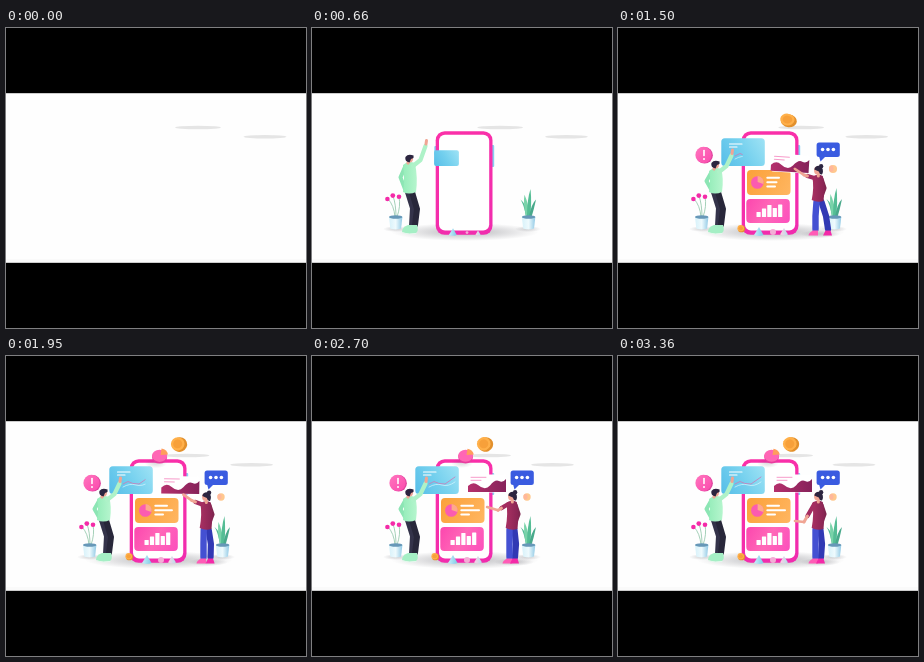
These frames come from a looping animation (300 px wide and 300 px high, 3390 ms). An HTML page with a canvas:

```html
<!DOCTYPE html>
<html lang="en">
<head>
<meta charset="utf-8">
<title>Phone dashboard</title>
<style>
html, body { margin: 0; width: 100%; height: 100%; overflow: hidden; background: #000; }
canvas { display: block; width: 300px; height: 300px; }
</style>
</head>
<body>
<canvas width="300" height="300"></canvas>
<script>
const c = document.querySelector('canvas').getContext('2d');
const LOOP = 3390, PINK = '#f42aa8', SKIN = '#f0a594', HAIR = '#2c2540';
let t = 0;

const progress = (start, dur) => Math.min(1, Math.max(0, (t - start) / dur));
const smooth = p => p * p * (3 - 2 * p);
const back = p => p <= 0 ? 0 : 1 + 2.7 * (p - 1) ** 3 + 1.7 * (p - 1) ** 2;

// Returns a function that eases through one value per time.
const track = (...times) => (...values) => {
  const i = times.findIndex(time => time > t);
  if (i === 0) return values[0];
  if (i < 0) return values.at(-1);
  const p = smooth((t - times[i - 1]) / (times[i] - times[i - 1]));
  return values[i - 1] + (values[i] - values[i - 1]) * p;
};

function group(x, y, sx, sy, angle, draw) {
  c.save();
  c.translate(x, y);
  c.rotate(angle);
  c.scale(sx, sy);
  c.translate(-x, -y);
  draw();
  c.restore();
}
function pop(start, dur, x, y, draw) {
  const s = back(progress(start, dur));
  if (s > 0) group(x, y, s, s, 0, draw);
}
function fade(start, dur, draw) {
  c.save();
  c.globalAlpha = smooth(progress(start, dur));
  if (c.globalAlpha > 0) draw();
  c.restore();
}
function oval(x, y, rx, ry, fill) {
  c.beginPath();
  c.ellipse(x, y, rx, ry, 0, 0, 7);
  c.fillStyle = fill;
  c.fill();
}
const dot = (x, y, r, fill) => oval(x, y, r, r, fill);
function box(x, y, w, h, r, fill) {
  c.beginPath();
  c.roundRect(x, y, w, h, r);
  c.fillStyle = fill;
  c.fill();
}
function shape(d, fill) {
  c.fillStyle = fill;
  c.fill(new Path2D(d));
}
function stroke(d, color, width) {
  c.strokeStyle = color;
  c.lineWidth = width;
  c.lineCap = c.lineJoin = 'round';
  c.stroke(new Path2D(d));
}
function blend(x1, y1, x2, y2, ...colors) {
  const g = c.createLinearGradient(x1, y1, x2, y2);
  colors.forEach((color, i) => g.addColorStop(i / (colors.length - 1), color));
  return g;
}
function shadow(x, y, rx, ry, alpha) {
  group(x, y, 1, ry / rx, 0, () => {
    const g = c.createRadialGradient(x, y, 0, x, y, rx);
    g.addColorStop(0, `rgba(70,70,80,${alpha})`);
    g.addColorStop(1, 'rgba(70,70,80,0)');
    dot(x, y, rx, g);
  });
}

function clouds() {
  const s = t / 1000;
  oval(192 - 5.9 * s, 99.5, 23, 1.8, '#e5e5e5');
  oval(259 - 6.85 * s, 108.8, 21.5, 1.8, '#e5e5e5');
}

function phone() {
  fade(150, 400, () => shadow(153, 204, 74, 9, .38));
  pop(60, 580, 152, 207, () => {
    box(122.3, 118, 3, 9, 1, '#86cff2');
    box(179, 117, 3.2, 22, 1, '#86cff2');
    box(123.7, 103.2, 56.8, 103.6, 9, blend(123, 103, 180, 207, '#fb30a8', '#f02cae'));
    box(127, 106.7, 50.2, 95.8, 6, '#fff');
  });
}

function pot(x) {
  shape(`M${x - 6.7} 189h13.4l-1.3 11.5q-5.4 2-10.8 0z`, blend(x - 6, 0, x + 6, 0, '#d9f2fa', '#eefafd', '#9ccfe8'));
  oval(x, 189, 6.7, 1.7, '#6798b8');
}

function plants() {
  pop(180, 420, 84, 201, () => {
    shadow(84, 201, 13, 3, .25);
    stroke('M83 189Q82 177 76 171M84 189Q84 176 81 168M85 189Q89 178 87 169', '#8fc5a8', .8);
    dot(75.4, 171, 2.3, PINK);
    dot(80.8, 167.6, 2.4, PINK);
    dot(87, 168.8, 2.3, PINK);
    pot(83.7);
  });
  pop(330, 350, 216, 201, () => {
    shadow(216, 201, 13, 3, .25);
    const grow = back(progress(510, 450));
    if (grow) group(216, 189, 1, grow, 0, () => {
      shape('M214 189Q212 176 208.5 171Q214 175 216.5 189Z', '#55bb97');
      shape('M214 189Q211 174 212.5 166Q217 176 217.5 189Z', '#79d3a9');
      shape('M215 189Q215 171 218.5 160Q220 175 218 189Z', '#55bd95');
      shape('M217 189Q219 176 224 171Q222 181 219.5 189Z', '#49a98b');
    });
    pot(216.6);
  });
}

function man() {
  const at = track(240, 660, 1000);
  const rise = at(0, -6, 0), handY = at(130, 114, 123.5);
  fade(220, 330, () => {
    stroke('M96 164L101 180L100 198', '#34334a', 6);
    stroke('M100 164L105 181L103 197', '#28273a', 6);
    shape('M90 204Q90 199 96 197L105 197Q107 203 104 205Q96 207 90 204Z', '#a5efc5');
    stroke('M91 205Q97 207 104 205.5', '#e6f8ee', 1);
    // Far arm on the hip
    stroke(`M93 ${145 + rise}L88.5 ${153 + rise * .6}L93 161`, '#8ce5b4', 4);
    shape(`M91 ${143 + rise}Q96 ${138 + rise} 103 ${141 + rise}Q106 150 104 164Q97 167 91 164Q93 152 91 ${143 + rise}Z`,
      blend(90, 0, 106, 0, '#94ecb9', '#b8f6cf'));
    stroke(`M101 ${144 + rise}L108.5 ${138 + rise}L113.5 ${handY + 4}`, '#aef2c8', 4.2);
    stroke(`M114 ${handY + 2}L114.5 ${handY - 1.5}`, SKIN, 3);
    stroke(`M96 ${141 + rise}L97 ${138 + rise}`, SKIN, 3.2);
    oval(97.8, 136.8 + rise, 3.2, 3.6, SKIN);
    shape(`M93.4 ${135 + rise}Q96 ${131.5 + rise} 101.6 ${133.6 + rise}L101.5 ${136 + rise}L99 ${137 + rise}L97.5 ${140.5 + rise}Q92.5 ${139.5 + rise} 93.4 ${135 + rise}Z`, HAIR);
  });
}

function blueCard() {
  pop(580, 540, 147, 138, () => {
    box(103.3, 110.2, 43.5, 27.8, 3.5, blend(103, 138, 147, 110, '#55bde8', '#74d0ee', '#a0e3f5'));
    fade(900, 200, () => stroke('M111.5 116H124M111.5 119H119', '#fff', 1.2));
    const reveal = smooth(progress(1050, 1250));
    if (!reveal) return;
    c.save();
    c.beginPath();
    c.rect(116, 110, 29 * reveal, 28);
    c.clip();
    stroke('M117 128L122 125.5L127 127.5L133 128L143 121', '#c583bd', .9);
    stroke('M117 131Q124 127 130 129T143 126', '#d9f6ff', .7);
    c.restore();
  });
}

function barCard() {
  pop(860, 500, 150, 183, () => {
    box(128.3, 171, 43.5, 24, 4, blend(128, 171, 172, 195, '#fc46ae', '#ff68b8', '#fc4fbd'));
    [5, 8.5, 12, 9, 12.5].forEach((height, i) => {
      const h = height * back(progress(740 + i * 25, 320));
      box(138.5 + i * 5.4, 189 - h, 4.2, h, .5, '#fff');
    });
  });
}

function pieCard() {
  pop(990, 430, 150.5, 154, () => {
    box(129, 142, 43.5, 25, 4, blend(129, 142, 172, 167, '#fba13a', '#fdab4c', '#ffb661'));
    dot(139.3, 154.5, 6.3, '#fb5cb0');
    shape('M139.6 154V148A6.3 6.3 0 0 1 145.4 156Z', '#ffa98a');
    const end = 158 + 9 * smooth(progress(1400, 700));
    stroke(`M149.3 149.8H161M149.3 154.2H${end}M149.3 158.6H157`, '#fff', 2);
  });
}

function chat() {
  pop(920, 500, 208, 126, () => {
    box(198.6, 114.6, 23.2, 14.4, 2.5, '#3a5be0');
    shape('M201 128H208L202.5 133.5Z', '#3a5be0');
    [204.6, 210, 215.4].forEach(x => dot(x, 121.5, 1.8, '#fff'));
  });
}

function coin(x, y, rx, ry, angle) {
  group(x, y, 1, 1, angle, () => {
    oval(x + rx * .12, y + ry * .12, rx, ry * .95, '#e2902c');
    oval(x - rx * .08, y - ry * .06, rx * .9, ry * .88, '#ffb04a');
    oval(x - rx * .08, y - ry * .06, rx * .6, ry * .58, '#f7a03a');
  });
}

function pieBadge() {
  pop(1560, 450, 154, 101, () => {
    shadow(150, 107, 11, 5, .2);
    oval(153.6, 101, 7.4, 6.4, '#e93d9f');
    oval(153.6, 99.8, 7.4, 6, '#ff66b5');
    shape('M154.5 99L155.5 92.8Q161 94 161.8 98.5Z', '#ff9d5c');
  });
}

function trinkets() {
  pop(1100, 400, 86, 127, () => {
    dot(86.6, 127.3, 8.3, '#e0459f');
    dot(85.5, 126.9, 8.1, blend(78, 120, 93, 135, '#ff73bd', '#fb4bae'));
    stroke('M86 122.5V127.5', '#fff', 1.6);
    dot(86, 131, 1, '#fff');
  });
  const at = track(1150, 1500, 2000);
  const x = at(169, 170, 172.5), y = at(98, 92, 88);
  pop(1150, 450, x, y, () => coin(x, y, 7.6, at(6, 6.4, 7.6), at(0, .1, -.4)));
  pop(1250, 400, 215, 141, () => {
    dot(215, 141, 3.7, '#ffc88e');
    oval(213.5, 140.7, 2, 2.8, '#ffb79b');
  });
  pieBadge();
  pop(570, 350, 141, 207, () => shape('M141 199L145.5 207Q141 209 136 207Z', blend(136, 0, 145, 0, '#c8effa', '#84cce8')));
  pop(600, 350, 166, 207, () => shape('M166 200L170 206.5Q166 208.5 162 206.5Z', blend(162, 0, 170, 0, '#ffd0e3', '#b5deec')));
  pop(620, 350, 155, 205, () => dot(155, 204, 3, '#f3add6'));
  const low = track(850, 1020, 1300)(201, 195, 200.5);
  pop(850, 350, 123, low, () => coin(123, low, 3.6, 3.6, 0));
}

function waveChart(at) {
  const x = at(-2.5, -3, 0, 0, 0), y = at(24, 8, 0, 0, 0);
  fade(800, 200, () => {
    c.save();
    c.translate(x, y);
    group(176, 129, 1, 1, at(-.3, .06, 0, 0, 0), () => {
      box(156, 118.5, 38, 18, 2, '#fff');
      shape('M156 136V130Q161 125 166 129Q173 135 178 129.5Q183 123 187 125Q191 127 194 123V136Z', blend(156, 0, 194, 0, '#b5306c', '#86225a'));
      stroke('M159 121.3H174M159 124.3H169', '#f79bca', 1);
    });
    c.restore();
  });
}

function woman(at) {
  const dx = at(-2.5, .3, .3, .3, .3), dy = at(7.5, 2, 0, 0, 0);
  const hipX = at(199.5, 201, 200, 200, 200), foot = at(209, 210, 203, 203, 203);
  const handX = at(177.5, 177, 177.5, 174, 177), handY = at(154.5, 141, 138, 157, 165);
  const elbowX = 186, elbowY = at(158, 147, 144, 159, 166);
  fade(750, 230, () => {
    c.save();
    c.translate(8 * (1 - smooth(progress(750, 250))), 0);
    shadow(202, 206, 20, 4, .25);
    stroke(`M${hipX + 2.5} 174L${(hipX + foot) / 2 + 2.5} 188L${foot} 201`, '#3139b4', 6.2);
    stroke(`M${hipX - 2.5} 174L197.5 188L197.5 201`, '#4450d2', 6.4);
    shape('M195 202.5H200V207.5H190.5Q190.5 205 195 202.5Z', '#ff5cb6');
    shape(`M${foot - 2.5} 202.5H${foot + 2.5}L${foot + 4} 207.5H${foot - 5}Z`, PINK);
    c.save();
    c.translate(dx, dy);
    stroke('M203.5 149L206.5 158L203.5 166', '#80264f', 3.6);
    shape(`M194 147Q199 143 204.5 146Q207 156 ${205.5 - dx} ${173 - dy}Q199 ${175 - dy} ${193.7 - dx} ${172 - dy}Q196 157 194 147Z`,
      blend(193, 0, 207, 0, '#aa3163', '#862352'));
    stroke('M200 146V142', SKIN, 3);
    oval(199, 140.5, 3.2, 4, SKIN);
    shape('M196 139.5Q197 135 202 136Q206 139 204 144Q202 146 200.5 141.5Z', HAIR);
    dot(202.8, 136.3, 2.2, HAIR);
    c.restore();
    const cuff = `${(elbowX * 2 + 196 + dx) / 3} ${(elbowY * 2 + 148 + dy) / 3}`;
    stroke(`M${elbowX} ${elbowY}L${handX} ${handY}`, SKIN, 2.7);
    stroke(`M${196 + dx} ${148 + dy}L${cuff}`, '#a42c60', 4.3);
    stroke(`M${cuff}L${elbowX} ${elbowY}`, SKIN, 3);
    c.restore();
  });
}

function frame(now) {
  t = now % LOOP;
  c.fillStyle = '#000';
  c.fillRect(0, 0, 300, 300);
  c.fillStyle = '#fefefe';
  c.fillRect(0, 65.2, 300, 169.6);
  c.fillStyle = '#fafafa';
  c.fillRect(0, 231, 300, 3);
  const reach = track(1020, 1500, 2150, 3030, 3360);
  clouds();
  phone();
  plants();
  blueCard();
  barCard();
  pieCard();
  trinkets();
  chat();
  man();
  waveChart(reach);
  woman(reach);
  requestAnimationFrame(frame);
}
requestAnimationFrame(frame);
</script>
</body>
</html>
```
